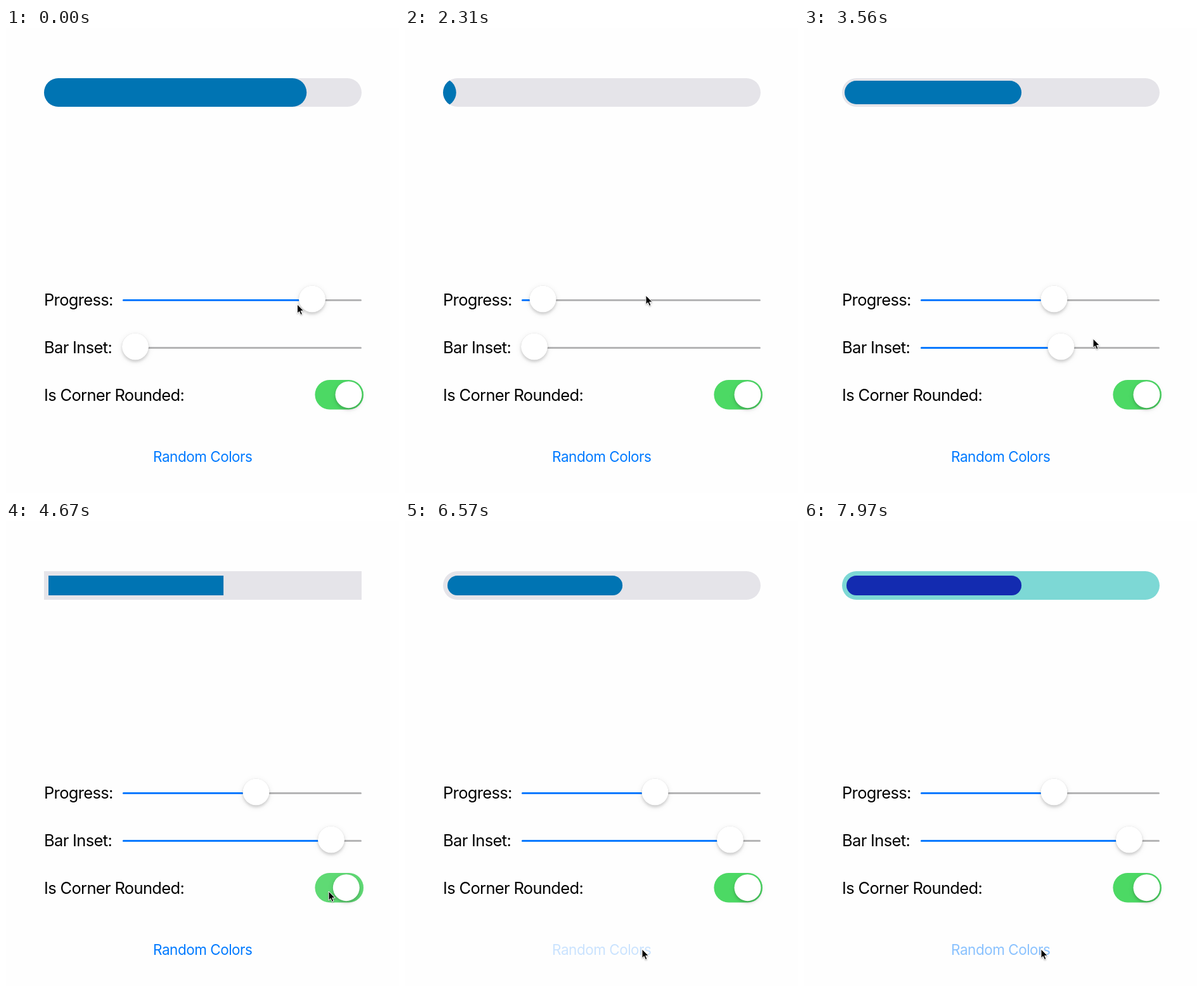
Recreate the animation shown at these times as an HTML page. Size 620 px wide and 732 px high, loop 8000 ms.

```html
<!DOCTYPE html>
<html lang="en">
<head>
<meta charset="utf-8">
<title>Progress bar demo</title>
<style>
  html, body { margin: 0; width: 100%; height: 100%; overflow: hidden; background: #fefefe; }
  svg { display: block; width: 620px; height: 732px; }
  text { font-family: Inter, Roboto, sans-serif; font-size: 25.5px; letter-spacing: -0.026em; }
  #button { font-size: 22.5px; letter-spacing: -0.022em; fill: #007aff; text-anchor: middle; }
  .rail { fill: #b5b5b6; }
  .done { fill: #067aff; }
  .thumb {
    fill: #fff;
    filter: drop-shadow(0 0 .5px rgba(0, 0, 0, .18))
            drop-shadow(0 3px 2px rgba(0, 0, 0, .14))
            drop-shadow(0 2px 4px rgba(0, 0, 0, .09));
  }
  #cursor { filter: drop-shadow(0 1px 1px rgba(0, 0, 0, .3)); }
</style>
</head>
<body>
<svg viewBox="0 0 620 732">
  <defs>
    <clipPath id="inside"><rect id="clip"/></clipPath>
    <g id="rail"><rect class="rail" x="184" y="427" width="377" height="3" rx="1.5"/></g>
  </defs>

  <rect id="track" x="60" y="79" width="501" height="45"/>
  <g clip-path="url(#inside)"><rect id="fill" width="700"/></g>

  <text x="60" y="437">Progress:</text>
  <text x="60" y="512">Bar Inset:</text>
  <text x="60" y="587">Is Corner Rounded:</text>

  <g id="progress">
    <use href="#rail"/>
    <rect class="done" x="184" y="427" height="3" rx="1.5"/>
    <circle class="thumb" cy="426.5" r="21"/>
  </g>
  <g id="inset" transform="translate(0 75)">
    <use href="#rail"/>
    <rect class="done" x="184" y="427" height="3" rx="1.5"/>
    <circle class="thumb" cy="426.5" r="21"/>
  </g>

  <rect x="487.5" y="554" width="76.5" height="46.5" rx="23.25" fill="#e5e5e5"/>
  <rect id="hole" x="-36" y="-21" width="72" height="42" rx="21" fill="#fefefe"/>
  <rect id="green" x="487.5" y="554" width="76.5" height="46.5" rx="23.25" fill="#4cd964"/>
  <circle id="knob" class="thumb" cy="577.2" r="21"/>

  <text id="button" x="310.3" y="683">Random Colors</text>

  <path id="cursor" d="M0 0V14.2L3.2 11.3L5.5 16.5L8 15.4L5.7 10.3H10.2Z"
        fill="#000" stroke="#fff" stroke-linejoin="round"/>
</svg>

<script>
  const LOOP = 8000;
  const $ = id => document.getElementById(id);
  const set = (el, attrs) => {
    for (const name in attrs) el.setAttribute(name, attrs[name]);
  };

  // A track is a first value and eased moves: [from time, to time, value].
  const progress = { first: 483, moves: [[230, 920, 221.5], [1060, 1220, 217.5], [2320, 2690, 394.5]] };
  const inset = { first: 204, moves: [[3130, 3845, 513]] };
  const toggle = { first: 1, moves: [[4600, 4920, 0], [5600, 5940, 1]] };
  const label = { first: 1, moves: [[6470, 6470, .2], [7800, 7970, .45]] };

  // The pointer runs ahead of the thumbs it drags.
  const pointer = [
    [60, 60, 421, 435], [230, 860, 230, 435],       // drag progress down
    [1300, 1640, 222, 502], [1890, 2070, 222, 421],
    [2070, 2360, 393, 421],                         // drag progress up
    [2690, 2960, 207, 494], [3060, 3760, 517, 488], // drag inset up
    [3800, 4330, 509, 590], [4620, 4670, 509, 583], // toggle
    [5630, 5930, 400, 664], [5930, 6330, 374, 674]  // button
  ];
  const pointerX = { first: 459.5, moves: pointer.map(([a, b, x]) => [a, b, x]) };
  const pointerY = { first: 435, moves: pointer.map(([a, b, , y]) => [a, b, y]) };

  const FIRST_CLICK = 6600, CLICK_GAP = 353;
  const palettes = [
    ['#e5e4e9', '#0074b3'],
    ['#93c765', '#b9475d'],
    ['#eda043', '#a35d96'],
    ['#c58bd0', '#3f9a6b'],
    ['#7dd8d5', '#132bb0']
  ];

  const smooth = u => u * u * (3 - 2 * u);

  function at({ first, moves }, time) {
    let value = first;
    for (const [from, to, target] of moves) {
      if (time < from) break;
      const u = time >= to ? 1 : (time - from) / (to - from);
      value += (target - value) * smooth(u);
    }
    return value;
  }

  // Places a slider thumb and returns the slider's value, 0 to 1.
  function slide(id, x) {
    const slider = $(id);
    set(slider.querySelector('.done'), { width: x - 184 });
    set(slider.querySelector('.thumb'), { cx: x });
    return (x - 203.5) / 338;
  }

  function drawBar(value, gap, rounded, [track, fill]) {
    const height = 45 - 2 * gap;
    const box = { y: 79 + gap, height, rx: rounded ? height / 2 : 0 };
    set($('track'), { rx: rounded ? 22.5 : 0, fill: track });
    set($('clip'), { ...box, x: 60 + gap, width: 501 - 2 * gap });
    set($('fill'), { ...box, x: 60 + 501 * value - 700, fill });
  }

  function drawSwitch(on) {
    set($('hole'), { transform: `translate(525.75 577.25) scale(${1 - on})` });
    set($('green'), { opacity: on });
    set($('knob'), { cx: 511 + 29.5 * on });
  }

  function draw(time) {
    const value = slide('progress', at(progress, time));
    const gap = Math.round(7.5 * slide('inset', at(inset, time)));
    const rounded = time < 4620 || time >= 5690;
    const clicks = Math.max(0, Math.floor((time - FIRST_CLICK) / CLICK_GAP) + 1);

    drawBar(value, gap, rounded, palettes[clicks]);
    drawSwitch(at(toggle, time));
    set($('button'), { opacity: at(label, time) });
    set($('cursor'), { transform: `translate(${at(pointerX, time)} ${at(pointerY, time)})` });
  }

  const start = performance.now();
  function tick() {
    draw((performance.now() - start) % LOOP);
    requestAnimationFrame(tick);
  }
  draw(0);
  requestAnimationFrame(tick);
</script>
</body>
</html>
```
